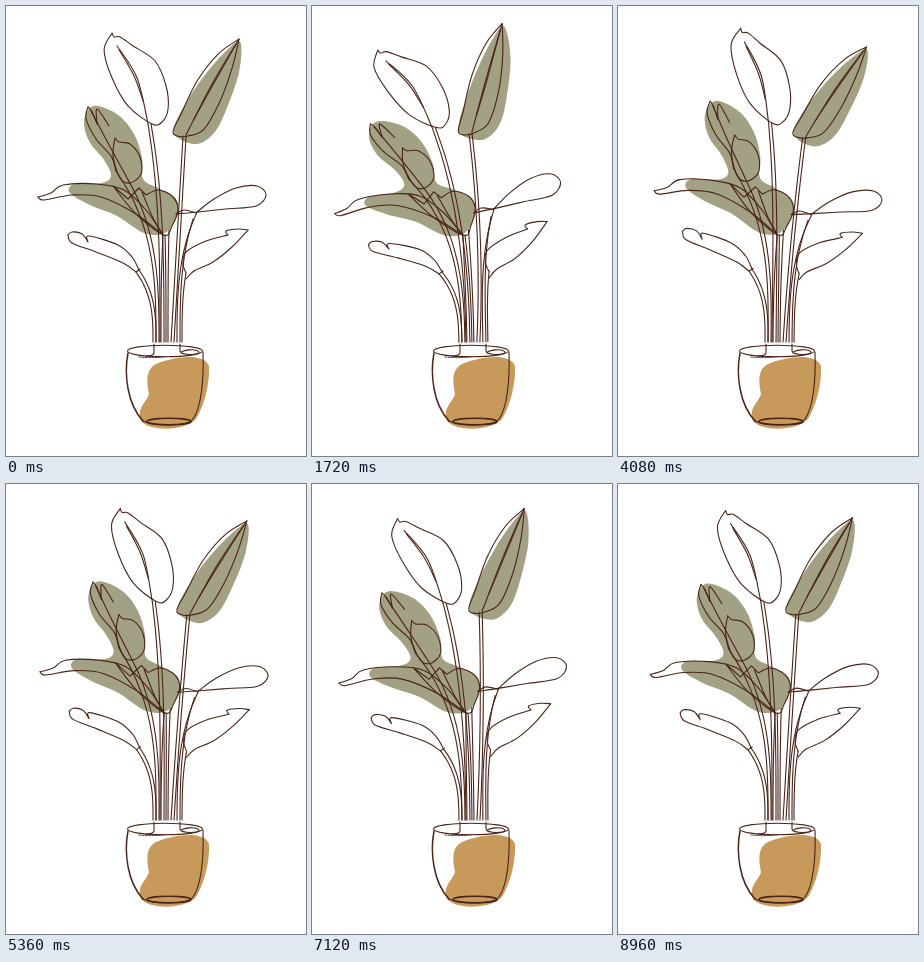
Write an HTML page that moves like this. It is 300x450 px and loops after 9000 ms.

```html
<!DOCTYPE html>
<html lang="en">
<head>
<meta charset="utf-8">
<title>Swaying plant</title>
<style>
  html, body { margin: 0; width: 100%; height: 100%; overflow: hidden; background: #fff; }
  svg { display: block; width: 100vw; height: 100vh; }
  .line { fill: none; stroke: #4b2419; stroke-width: 1.1; stroke-linecap: round; stroke-linejoin: round; }
  .bold { stroke-width: 1.5; }
  .soil { stroke-width: .9; stroke-dasharray: 2 1.2; }
  .leaf { fill: #a2a184; }
  .clay { fill: #c79a5c; }
</style>
</head>
<body>
<svg viewBox="0 0 300 450">
  <path class="clay" d="M150 358C170 350 198 347 203 360C204 378 198 400 190 413C180 425 144 426 135 415C130 402 141 396 143 388C141 376 139 364 150 358Z"/>
  <g id="plant"></g>
  <g class="line">
    <ellipse cx="159" cy="345" rx="37.5" ry="5.8"/>
    <path d="M148 338V347Q147 350 140 350M174 338V345C176 350 193 349 193 346C190 342 176 344 175 347"/>
    <path class="soil" d="M133 351Q147 352.5 161 350.5"/>
    <path class="bold" d="M122 347C118 368 121 398 137 415"/>
    <path d="M197 346C198 375 195 402 187 413C182 420 150 421 137 415"/>
    <ellipse class="bold" cx="163" cy="415.5" rx="22" ry="3.2"/>
  </g>
</svg>
<script>
const LOOP = 9000, STEP = 40, SOIL = 336;
const ROOT = { x: 158, y: 352 };

// Curvature of the plant: mean and [cos, sin] harmonics, in 1e-5 rad per px
const MEAN = -12.7;
const HARMONICS = [[-23.8, -17.7], [30.7, -17.5], [11.5, -7.1], [1.4, -4.6], [-4.2, -1.9], [-2.7, 0]];

// Key points of smooth outlines; "/" marks a sharp corner.
const FILLS = [
  "88,100 112,109 128,128 136,152 137,173 152,182 170,193 171,210 159,227 138,227 111,210 84,199 64,187 68,178 95,177 105,170 98,154 83,135 78,114",
  "234,36 233,66 220,104 208,127 191,138 172,132 168,121 181,95 198,70 218,47"
];

const LEAVES = [
  // tall left
  "106,27 108,31 114,31 127,40 149,55 160,80 162,103 156,116 146,118 122,100 106,72 98,44 106,27",
  "111,40 131,72 142,118",
  "113,44 128,70 137,95",
  // tall right
  "233,33 212,48 191,75 175,108 167,125 171,130 182,130 198,123 214,95 226,62 233,33",
  "233,33 206,78 180,129",
  "230,38 204,84 188,113",
  // upper left
  "82,101 80,113 90,133 105,150 110,165",
  "82,101 86,106 91,118 / 91,103 103,120",
  "85,105 103,139 120,170",
  // small drooping
  "109,132 113,136 124,138 134,151 135,168 124,177 114,172 107,150 109,132",
  // long left
  "32,191 45,187 57,179 90,178 118,184 140,204 157,229",
  "32,191 38,194 66,189 95,191 130,208 157,229",
  // folded
  "107,180 122,193 / 133,182 / 140,189 / 152,184 166,190 172,203 166,220 158,229 130,208 107,180",
  "136,186 147,212 157,229",
  // right paddle
  "170,208 192,206 220,203 250,200 260,189 251,180 230,182 208,193 191,206",
  "170,208 178,204 190,207",
  // low right
  "242,224 226,241 207,256 188,265 180,273",
  "242,224 232,223 220,225 222,229 / 200,235 180,246 177,258 180,267",
  // low left
  "62,229 66,226 76,228 82,236 / 83,230 112,239 126,251 133,264",
  "62,229 66,237 90,246 117,257 130,266 / 134,263"
];

// Each stem runs from a leaf to the soil; a higher arch straightens sooner.
const STEMS = [
  stem(130, 266, 147), stem(133, 264, 150),
  stem(110, 165, 150), stem(120, 170, 153),
  stem(142, 118, 154), stem(145, 118, 158),
  stem(157, 229, 155), stem(159, 229, 160), stem(163, 224, 162),
  stem(177, 130, 165, 1), stem(180, 130, 168, 1),
  stem(191, 206, 171), stem(187, 213, 174), stem(180, 267, 176)
];

function stem(x, y, foot, arch = 3) {
  const pts = [];
  for (let t = 0; t <= 1; t += 1 / 8) {
    pts.push([x + (foot - x) * (1 - (1 - t) ** arch), y + (SOIL - y) * t]);
  }
  return [pts];
}

function parse(text) {
  const parts = text.split(" / ").map(p => p.split(" ").map(q => q.split(",").map(Number)));
  for (let i = 1; i < parts.length; i++) parts[i].unshift(parts[i - 1].at(-1));
  return parts;
}

const show = p => p[0].toFixed(2) + " " + p[1].toFixed(2);

function curve(parts, closed, warp) {
  let d = "";
  for (const raw of parts) {
    const pts = raw.map(warp), n = pts.length;
    const at = i => pts[closed ? (i + n) % n : Math.max(0, Math.min(n - 1, i))];
    const handle = (i, dir) => at(i).map((v, axis) => v + dir * (at(i + 1)[axis] - at(i - 1)[axis]) / 6);
    if (!d) d = "M" + show(pts[0]);
    for (let i = 0; i < (closed ? n : n - 1); i++) {
      d += "C" + [handle(i, 1), handle(i + 1, -1), at(i + 1)].map(show).join(" ");
    }
  }
  return d;
}

// Bends the vertical axis above the root into an arc of curvature k.
function bend(k) {
  return ([x, y]) => {
    const h = ROOT.y - y, u = x - ROOT.x;
    if (Math.abs(k) < 1e-8) return [x, y];
    const c = Math.cos(k * h), s = Math.sin(k * h);
    return [ROOT.x + (1 - c) / k + u * c, ROOT.y - s / k + u * s];
  };
}

function sway(t) {
  const a = 2 * Math.PI * t / LOOP;
  const wave = (sum, [c, s], i) => sum + c * Math.cos(a * (i + 1)) + s * Math.sin(a * (i + 1));
  return 1e-5 * HARMONICS.reduce(wave, MEAN);
}

const group = document.getElementById("plant");

function add(parts, cls) {
  const el = document.createElementNS("http://www.w3.org/2000/svg", "path");
  el.setAttribute("class", cls);
  group.append(el);
  return { el, parts, closed: cls === "leaf" };
}

const plant = [
  ...FILLS.map(text => add(parse(text), "leaf")),
  ...LEAVES.map(text => add(parse(text), "line")),
  ...STEMS.map(parts => add(parts, "line"))
];

function draw(now) {
  const t = Math.floor((now % LOOP) / STEP) * STEP;
  const warp = bend(sway(t));
  for (const { el, parts, closed } of plant) el.setAttribute("d", curve(parts, closed, warp));
}

function tick() {
  draw(performance.now());
  requestAnimationFrame(tick);
}
tick();
</script>
</body>
</html>
```
